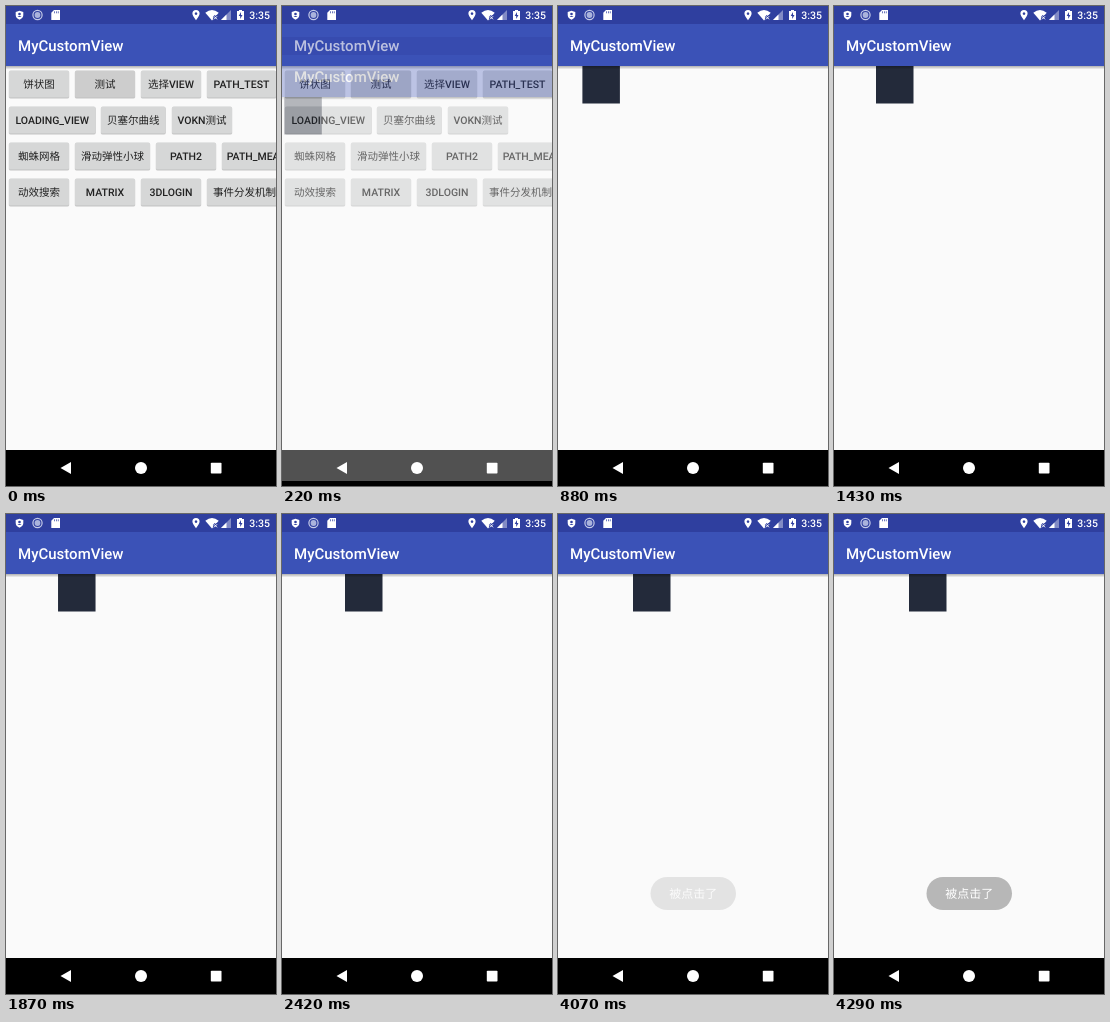
Write an HTML page that moves like this. It is 270 px wide and 480 px high and loops after 4.4 s.

```html
<!DOCTYPE html>
<html lang="zh-CN">
<head>
<meta charset="utf-8">
<title>MyCustomView</title>
<style>
  html, body { margin: 0; height: 100%; overflow: hidden; background: #fafafa; }
  svg { display: block; width: 100vw; height: 100vh; }
  text { font: 500 10.5px Roboto, "Noto Sans CJK SC", "Noto Sans CJK", sans-serif; text-rendering: geometricPrecision; }
  .title { font-size: 15px; fill: #fff; }
  .label { text-anchor: middle; fill: #212121; }
  #toast text { font-size: 12px; font-weight: 400; text-anchor: middle; }
</style>
</head>
<body>
<svg viewBox="0 0 270 480">
  <defs>
    <linearGradient id="shade" x2="0" y2="1">
      <stop stop-color="#000" stop-opacity=".3"/>
      <stop offset="1" stop-color="#000" stop-opacity="0"/>
    </linearGradient>
    <g id="bars">
      <rect y="60" width="270" height="3.5" fill="url(#shade)"/>
      <rect width="270" height="60" fill="#3b52b7"/>
      <rect width="270" height="18" fill="#2f3f9f"/>
      <text class="title" x="12" y="45">MyCustomView</text>
      <rect y="444" width="270" height="36"/>
    </g>
  </defs>

  <rect width="270" height="480" fill="#fafafa"/>
  <g id="menu"></g>
  <use href="#bars"/>

  <g id="screen">
    <rect width="270" height="480" fill="#fafafa"/>
    <rect id="box" y="60" width="37.5" height="37.5" fill="#232a3a"/>
    <use href="#bars"/>
  </g>

  <g id="toast">
    <rect x="92.5" y="363" width="85.5" height="33" rx="16.5" fill="#b7b7b7"/>
    <text x="135.2" y="384" fill="#fff">被点击了</text>
  </g>

  <g fill="#fff">
    <path d="M13.5 4.7 17.3 6v3q0 3-3.8 4.7Q9.7 12 9.7 9V6Z"/>
    <circle cx="13.5" cy="8" r="1.3" fill="#2f3f9f"/>
    <path d="M11.5 11q2-2 4 0" fill="#2f3f9f"/>
    <circle cx="31.5" cy="9" r="4.6" fill="none" stroke="#c5cbe8" stroke-width="1.2"/>
    <circle cx="31.5" cy="9" r="2.9" fill="#aab3dc"/>
    <path d="M48 4h6v10h-8.700V6.700Z"/>
    <path d="M48.500 5.300v2M50.500 5.300v2M52.300 5.300v2" stroke="#2f3f9f" stroke-width=".7"/>
    <path fill-rule="evenodd" d="M190 4a3.600 3.600 0 0 1 3.600 3.600Q193.600 10 190 14.200 186.400 10 186.400 7.600A3.600 3.600 0 0 1 190 4Zm0 2.300a1.300 1.300 0 1 0 .01 0Z"/>
    <path d="M199.300 6.700q6.700-5.200 13.400 0L206 14.500Z"/>
    <path d="m207.700 10 3.600 3.600m0-3.600-3.600 3.600" stroke="#2f3f9f" stroke-width="2.600"/>
    <path d="m208 10.300 3 3m0-3-3 3" stroke="#fff" stroke-width="1"/>
    <path d="M225 4v10h-10Z" opacity=".4"/>
    <path d="M220.500 8.500V14H215Z"/>
    <path d="M233 4h3v1h2v9h-7V5h2Z"/>
    <path d="m235 6-2.300 4h1.500v3l2.300-4H235Z" fill="#2f3f9f"/>
    <text x="243.300" y="13">3:35</text>
    <path d="M54.500 462 65 456v12Z"/>
    <circle cx="135" cy="462" r="6"/>
    <rect x="204.800" y="456.800" width="10.700" height="10.700" rx=".8"/>
  </g>
</svg>
<script>
const STEP = 110, LOOP = 4400;
const $ = id => document.getElementById(id);

// Each row: [label, left, width]
const rows = [
  [["饼状图", 3, 60], ["测试", 69, 60], ["选择VIEW", 135, 60], ["PATH_TEST", 201, 69]],
  [["LOADING_VIEW", 3, 86.5], ["贝塞尔曲线", 95, 64.5], ["VOKN测试", 166, 60]],
  [["蜘蛛网格", 3, 60], ["滑动弹性小球", 69, 75], ["PATH2", 150, 60], ["PATH_MEASURE", 216, 88]],
  [["动效搜索", 3, 60], ["MATRIX", 69, 60], ["3DLOGIN", 135, 60], ["事件分发机制", 201, 75]]
];
const button = ([label, x, w], y) => `
  <rect x="${x - .4}" y="${y + .3}" width="${w + .8}" height="28" rx="2" fill="#000" opacity=".1"/>
  <rect x="${x}" y="${y + .7}" width="${w}" height="27" rx="1.5" fill="#000" opacity=".15"/>
  <rect class="face" x="${x}" y="${y}" width="${w}" height="27" rx="1.5" fill="#d6d7d7"/>
  <text class="label" x="${x + w / 2}" y="${y + 17.4}">${label}</text>`;
$("menu").innerHTML = rows.map((row, i) => row.map(b => button(b, 64.5 + 36 * i)).join("")).join("");
const pressed = document.querySelectorAll(".face")[1];

// Linear interpolation through [time, value] pairs
function track(keys, t) {
  const i = keys.findIndex(k => k[0] >= t);
  if (i < 0) return keys[keys.length - 1][1];
  if (i === 0) return keys[0][1];
  const [t0, a] = keys[i - 1], [t1, b] = keys[i];
  return a + (b - a) * (t - t0) / (t1 - t0);
}

const slide = [[110, 37], [220, 31], [330, 5], [440, 1], [550, 1], [660, 0]];
const fade = [[0, 0], [110, .04], [220, .32], [330, .9], [440, 1]];
const travel = [[110, 1], [220, 2.3], [330, 3.5], [440, 5.5], [660, 13.5], [1100, 35.3], [1430, 42],
  [1650, 46.2], [2200, 60.8], [2420, 63], [2750, 70.2], [2970, 73], [3190, 74.6], [3300, 75]];
const toast = [[3960, 0], [4290, 1]];

function draw(now) {
  const t = Math.floor(now % LOOP / STEP) * STEP;
  pressed.setAttribute("fill", t === STEP ? "#c6c6c6" : "#cdcdcd");
  $("screen").setAttribute("transform", `translate(0 ${track(slide, t)})`);
  $("screen").setAttribute("opacity", track(fade, t));
  $("box").setAttribute("x", track(travel, t));
  $("toast").setAttribute("opacity", track(toast, t));
}

const start = performance.now();
function tick() {
  draw(performance.now() - start);
  requestAnimationFrame(tick);
}
tick();
</script>
</body>
</html>
```
